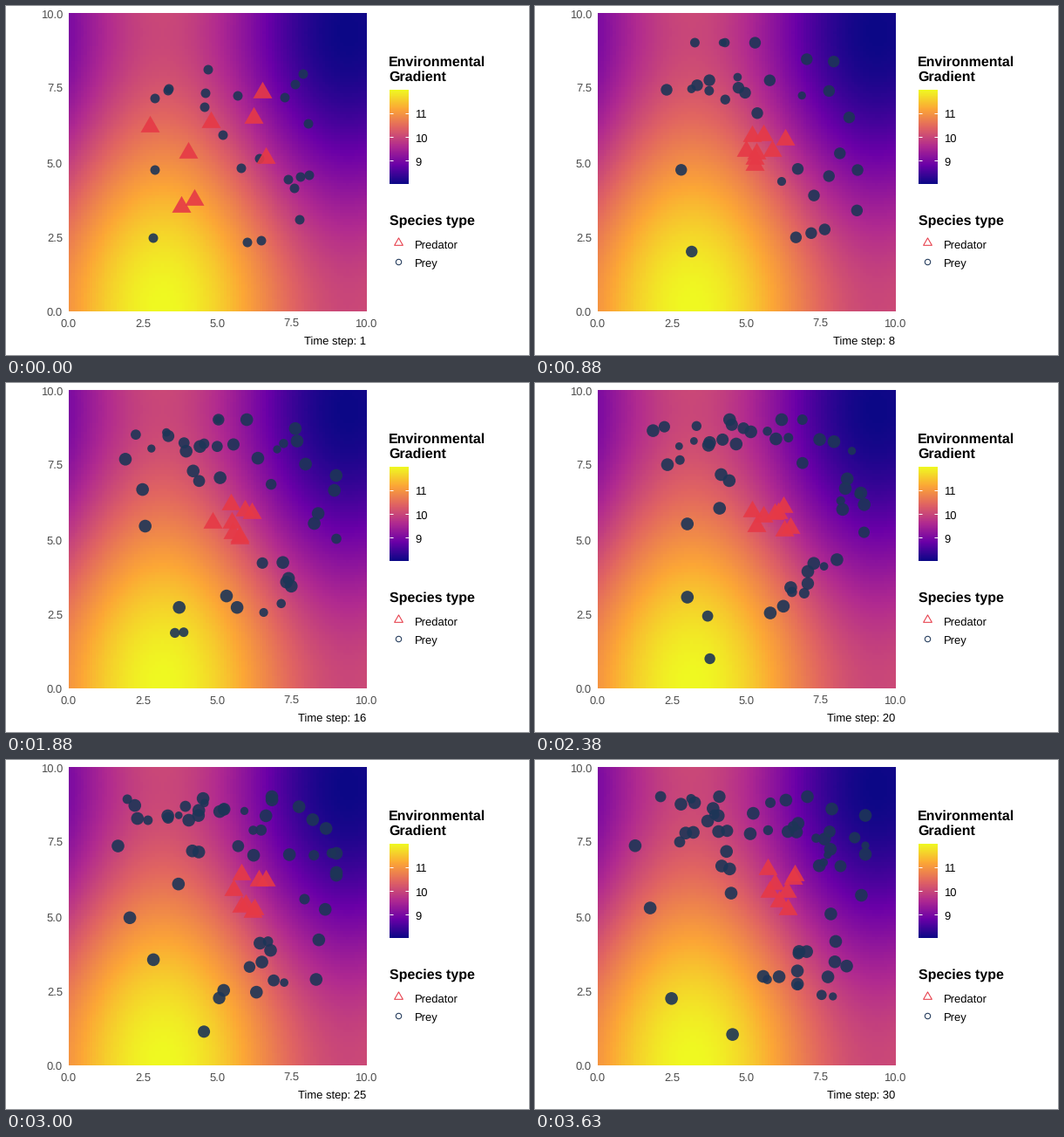
These frames come from a looping animation (600x400 px, 3750 ms). A matplotlib script:

```python
import numpy as np
import matplotlib.pyplot as plt
from matplotlib.animation import FuncAnimation
from matplotlib.colors import LinearSegmentedColormap

plt.rcParams["text.hinting"] = "none"

W, H, DPI = 600, 400, 100
STEPS = 30
RED, NAVY, GREY = "#E63946", "#1D3557", "#4D4D4D"
LEFT, TOP, RIGHT, BOTTOM = 72, 8, 413.5, 350

# Starting places in pixels
PREY = [
    (232, 73), (171, 106), (187, 95), (186, 97), (229, 100), (228, 116),
    (266, 103), (320, 105), (332, 90), (341, 78), (347, 135), (249, 148),
    (171, 188), (270, 186), (291, 175), (324, 199), (338, 196), (348, 194),
    (331, 209), (337, 245), (293, 269), (277, 271), (169, 266)]
PACK = [(165, 138), (235, 133), (294, 99), (284, 128),
        (298, 174), (209, 168), (216, 222), (201, 230)]
DEN_START, DEN_END = np.array([256, 166]), np.array([281, 147])
LOW, HIGH = (106, 42), (379, 316)
BIRTHS_PER_STEP = 39 / 29


def simulate(seed=11):
    """Prey wander, breed and shun the pack; predators gather at a den."""
    rng = np.random.default_rng(seed)
    prey, pack = np.array(PREY, float), np.array(PACK, float)
    age = np.full(len(prey), 5.0)
    states = []
    for step in range(STEPS):
        den = DEN_START + (DEN_END - DEN_START) * step / (STEPS - 1)
        if step:
            pack += 0.25 * (den - pack) + rng.normal(0, 8, pack.shape)
            away = prey - den
            dist = np.linalg.norm(away, axis=1, keepdims=True)
            flee = 8 * np.exp(-(dist / 50) ** 2) * away / (dist + 1)
            prey += flee + (0.2, -0.5) + rng.normal(0, 9, prey.shape)
            age += 1
            born = len(PREY) + round(BIRTHS_PER_STEP * step) - len(prey)
            parents = prey[rng.integers(len(prey), size=born)]
            prey = np.vstack([prey, parents + rng.normal(0, 10, (born, 2))])
            prey = np.clip(prey, LOW, HIGH)
            age = np.append(age, np.zeros(born))
        radius = np.minimum(4.4 * np.sqrt(1 + 0.11 * age), 7.3)
        states.append((prey.copy(), radius, pack.copy()))
    return states


def area(radius):
    return (2 * np.asarray(radius) * 72 / DPI) ** 2


states = simulate()
heat = LinearSegmentedColormap.from_list(
    "heat", plt.get_cmap("plasma")(np.linspace(0, 1, 6)))

fig = plt.figure(figsize=(W / DPI, H / DPI), dpi=DPI, facecolor="white")
ax = fig.add_axes([0, 0, 1, 1])
ax.axis("off")


def label(x, y, s, color="black", size=13, **kw):
    return ax.text(x, y, s, color=color, fontsize=size * 72 / DPI,
                   family="Liberation Sans", va="baseline", **kw)


# Environmental surface
grid = np.linspace(0, 10, 100)
surface = 10 + np.sin(grid / 2)[None, :] + np.cos(grid[::-1] / 3)[:, None]
ax.imshow(surface, cmap=heat, vmin=8, vmax=12, aspect="auto",
          interpolation="nearest", extent=(LEFT, RIGHT, BOTTOM, TOP))

for i in range(5):
    text = f"{2.5 * i:.1f}"
    label(LEFT + 85.25 * i, 368, text, GREY, ha="center")
    label(65, 355 - 85.25 * i, text, GREY, ha="right")

# Colour bar
label(439, 69, "Environmental", size=16, weight="bold")
label(439, 86, "Gradient", size=16, weight="bold")
ax.imshow(np.linspace(12, 8, 256)[:, None], cmap=heat, aspect="auto",
          extent=(440, 462, 204, 96))
for value in (9, 10, 11):
    y = 204 - 27 * (value - 8)
    ax.hlines([y - 0.5] * 2, [440, 458], [444, 462], color="white", lw=0.72)
    label(469, y + 5.5, str(value))

# Species key
label(440, 251, "Species type", size=16, weight="bold")
ax.scatter(450.5, 271.5, s=area(5.6), marker=(3, 0, 0), facecolors="none",
           edgecolors=RED, linewidths=0.75)
ax.scatter(450.5, 293.5, s=area(3.2), facecolors="none",
           edgecolors=NAVY, linewidths=0.75)
label(469, 278, "Predator")
label(469, 299, "Prey")

prey_dots = ax.scatter([], [], color=NAVY, alpha=0.9, linewidths=0, zorder=3)
pack_dots = ax.scatter([], [], s=area(12.7), marker=(3, 0, 0), color=RED,
                       alpha=0.9, linewidths=0, zorder=4)
clock = label(413, 388, "", ha="right")

ax.set_xlim(0, W)
ax.set_ylim(H, 0)


def draw(frame):
    prey, radius, pack = states[frame]
    prey_dots.set_offsets(prey)
    prey_dots.set_sizes(area(radius))
    pack_dots.set_offsets(pack)
    clock.set_text(f"Time step: {frame + 1}")
    return prey_dots, pack_dots, clock


anim = FuncAnimation(fig, draw, frames=STEPS, interval=125,
                     repeat=True, repeat_delay=0)
plt.show()
```
